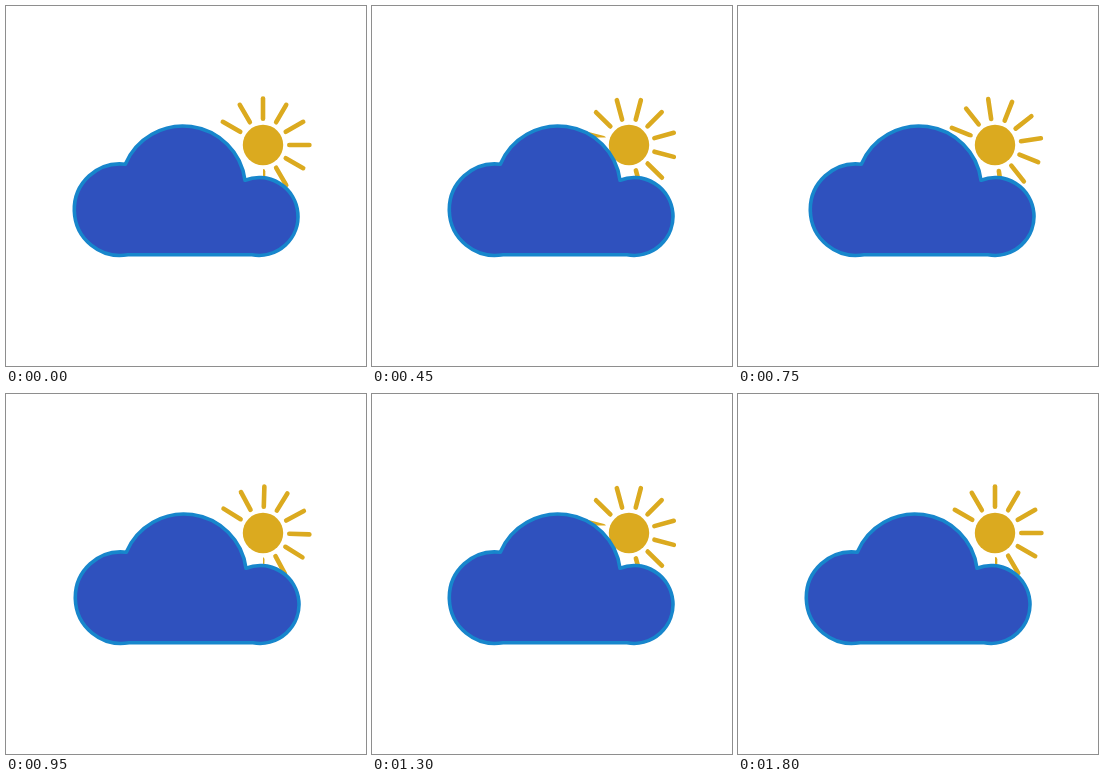
Animation of 360 by 360 pixels, one loop 1850 ms. Source, as an HTML page:

```html
<!DOCTYPE html>
<html lang="en">
<head>
<meta charset="utf-8">
<title>Cloud and sun</title>
<style>
  html, body { margin: 0; width: 100%; height: 100%; overflow: hidden; background: #fff; }
  svg { display: block; width: 100vw; height: 100vh; }
  .sun { fill: #dbaa1f; stroke: #dbaa1f; stroke-width: 4.6; stroke-linecap: round; }
  .disc { stroke: none; }
  .cloud { fill: #2f51be; stroke: #1786cc; stroke-width: 3.6; stroke-linejoin: round; }
</style>
</head>
<body>
<svg viewBox="0 0 360 360">
  <!-- rays fade out of sight on the side facing the cloud -->
  <clipPath id="open"><path d="M-60 -60H60V60H0V-7.5H-60Z"/></clipPath>
  <g class="sun" transform="translate(257 139)">
    <circle class="disc" r="20.2"/>
    <g clip-path="url(#open)"><g id="rays"></g></g>
  </g>
  <path id="cloud" class="cloud" d="M122 248.7
    A45.75 45.75 0 1 1 119.3 158.2
    A62.6 62.6 0 0 1 239 174.2
    A38.9 38.9 0 1 1 246 248.7 Z"/>
</svg>
<script>
  const STEP = 50, LOOP = 1850, CYCLE = 18;
  // [step within a cycle, value]
  const DRIFT = [[0, 0], [4, 4], [8, 9], [10, 9], [14, 5], [15, 4], [18, 0]];
  const TURN = [[0, 0], [4, 6.8], [8, 14.8], [14, 14.8], [15, 21.6], [18, 30]];

  const rays = document.getElementById('rays');
  const cloud = document.getElementById('cloud');

  for (let angle = 0; angle < 360; angle += 30) {
    const ray = document.createElementNS('http://www.w3.org/2000/svg', 'line');
    ray.setAttribute('y1', -26.3);
    ray.setAttribute('y2', -46.4);
    ray.setAttribute('transform', `rotate(${angle})`);
    rays.append(ray);
  }

  function sample(keys, x) {
    const i = Math.max(1, keys.findIndex(key => key[0] >= x));
    const [x0, y0] = keys[i - 1];
    const [x1, y1] = keys[i];
    return y0 + (y1 - y0) * (x - x0) / (x1 - x0);
  }

  function draw(time) {
    const phase = Math.floor(time % LOOP / STEP) % CYCLE;
    cloud.setAttribute('transform', `translate(${sample(DRIFT, phase)} 0)`);
    rays.setAttribute('transform', `rotate(${sample(TURN, phase)})`);
  }

  const start = performance.now();
  function tick() {
    draw(performance.now() - start);
    requestAnimationFrame(tick);
  }
  tick();
</script>
</body>
</html>
```
